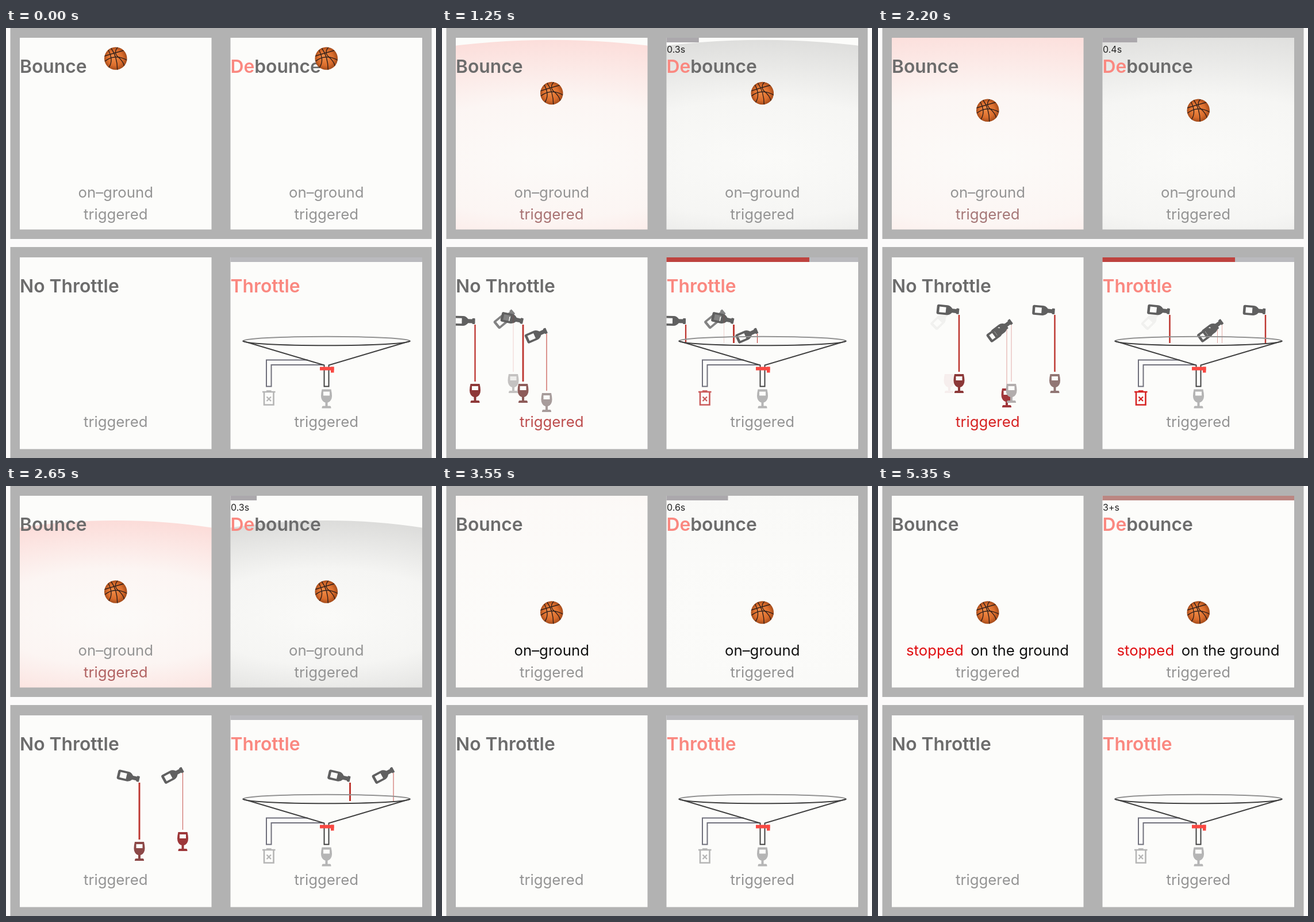
Write an HTML page with a canvas that moves like this. It is 748 by 748 pixels and loops after 5400 ms.

```html
<!DOCTYPE html>
<html lang="en">
<head>
<meta charset="utf-8">
<title>Debounce and throttle</title>
<style>
  html, body { margin: 0; width: 100%; height: 100%; overflow: hidden; background: #fbfafa; }
  canvas { display: block; width: 748px; height: 748px; }
</style>
</head>
<body>
<canvas id="stage" width="748" height="748"></canvas>
<script>
const g = document.getElementById('stage').getContext('2d');
const LOOP = 5400, SPEED = 0.0016;
const LEFT = 24, RIGHT = 390.5, SHIFT = RIGHT - LEFT, SIZE = 333.5, TOP = 17, BOTTOM = 399;
const GREY = [148, 148, 148], RED = [215, 32, 32], ICON = [181, 181, 181];
const PAPER = '#fcfcfa', FONT = 'Inter, sans-serif';

// Ground contacts and the height of the bounce that follows each one
const HITS = [1040, 1975, 2480, 2821, 3045, 3150];
const HEIGHTS = [137, 77, 36, 14, 4];
const LAST_HIT = HITS[HITS.length - 1], SETTLED = LAST_HIT + 2 / SPEED + 5;

// Pours: mouth x, glass y, start time
const POURS = [
  [57.5, 635, 636], [141, 635, 775], [182, 651, 1075], [124, 618, 1205],
  [224, 643, 1275], [141, 618, 1626], [307.5, 618, 1790], [232, 635, 2135]
];
const POUR_TIME = 1000, COOLDOWN = 745;

const drops = POURS.map(p => p[2] + 60), accepted = [], rejected = [];
for (const t of drops) {
  const open = !accepted.length || t - accepted[accepted.length - 1] >= COOLDOWN;
  (open ? accepted : rejected).push(t);
}

const clamp = v => Math.max(0, Math.min(1, v));
const rgb = c => `rgb(${c.map(Math.round)})`;
const mix = (a, b, k) => a.map((v, i) => v + (b[i] - v) * k);
const since = (times, t) => t - Math.max(-1e6, ...times.filter(x => x <= t));
const flash = (from, times, t) => rgb(mix(from, RED, clamp(1 - since(times, t) / 300)));

function rect(x, y, w, h, color) {
  g.fillStyle = color;
  g.fillRect(x, y, w, h);
}

function text(str, x, y, size, color, align = 'left', weight = 400) {
  g.font = `${weight} ${size}px ${FONT}`;
  g.textAlign = align;
  g.fillStyle = color;
  g.fillText(str, x, y);
}

const label = (str, x, y, color, align = 'center') => text(str, x, y, 25.8, color, align);

function title(str, x, y, color = '#6c6c6c') {
  text(str, x, y, 31.8, color, 'left', 600);
  return x + g.measureText(str).width;
}

function stroke(path, color, width = 2) {
  g.strokeStyle = color;
  g.lineWidth = width;
  g.stroke(new Path2D(path));
}

function inPanel(x, y, draw) {
  g.save();
  g.beginPath();
  g.rect(x, y, SIZE, SIZE);
  g.clip();
  draw();
  g.restore();
}

function ballHeight(t) {
  if (t < HITS[0]) return 167 * (1 - (t / HITS[0]) ** 2.5);
  const i = HITS.filter(h => h <= t).length - 1;
  if (i >= HEIGHTS.length) return 0;
  const k = (t - HITS[i]) / (HITS[i + 1] - HITS[i]);
  return HEIGHTS[i] * (1 - Math.abs(2 * k - 1) ** 2.5);
}

function ball(x, y) {
  g.save();
  g.translate(x, y);
  const shade = g.createRadialGradient(-4, -3, 2, 0, 0, 20);
  shade.addColorStop(0, '#f08a45');
  shade.addColorStop(0.65, '#d96c2c');
  shade.addColorStop(1, '#a24a1a');
  g.fillStyle = shade;
  g.beginPath();
  g.arc(0, 0, 19.8, 0, 7);
  g.fill();
  g.clip();
  stroke('M-20 -4Q-4 -9 14 -14M-8 -18Q3 -3 3 20M-19 5Q-2 -9 20 3M4 -20Q-5 -10 5 -2Q13 5 15 13M-13 -15Q-3 3 -12 16', '#33201a', 1.4);
  g.restore();
}

function ripple(x, age, color) {
  if (age < 0 || age > 500) return;
  const r = age * 0.98;
  g.save();
  g.globalAlpha = 1 - (age / 500) ** 2;
  g.translate(x, 227.5);
  g.scale(2.62, 1);
  const fade = g.createRadialGradient(0, 0, 0, 0, 0, r);
  fade.addColorStop(0, `rgba(${color},.01)`);
  fade.addColorStop(0.5, `rgba(${color},.045)`);
  fade.addColorStop(1, `rgba(${color},.2)`);
  g.fillStyle = fade;
  g.beginPath();
  g.arc(0, 0, r, 0, 7);
  g.fill();
  g.restore();
}

function bouncePanel(x, t, triggers, rippleTimes, color) {
  const center = x + SIZE / 2, height = ballHeight(t);
  inPanel(x, TOP, () => rippleTimes.forEach(h => ripple(center, t - h, color)));
  if (t >= SETTLED) {
    label('stopped', x + 25, 295, '#e00f12', 'left');
    label('on the ground', x + 308, 295, '#111', 'right');
  } else {
    label('on–ground', center, 295, height < 10 ? '#111' : rgb(GREY));
  }
  label('triggered', center, 332.5, flash(GREY, triggers, t));
  return () => ball(center, 220 - height);
}

function glass(x, y, color) {
  g.save();
  g.translate(x, y);
  g.fillStyle = color;
  g.fill(new Path2D('M-8 -16H8Q11 -3 8 2Q6 6 2 7V13H6Q8 13 8 17H-8Q-8 13 -6 13H-2V7Q-6 6 -8 2Q-11 -3 -8 -16Z'));
  rect(-5.5, -12, 11, 7, PAPER);
  g.restore();
}

function bottle(x, y, angle) {
  g.save();
  g.translate(x, y);
  g.rotate(angle * Math.PI / 180);
  g.fillStyle = '#606060';
  g.fill(new Path2D('M0 -4Q0 -5 -1 -5H-4Q-5 -5 -5 -3.5H-12Q-16 -8.5 -21 -8.5H-36Q-39 -8.5 -39 -5.5V5.5Q-39 8.5 -36 8.5H-21Q-16 8.5 -12 3.5H-5Q-5 5 -4 5H-1Q0 5 0 4ZM-34.5 -4.8V4.8H-23V-4.8Z'), 'evenodd');
  g.restore();
}

function glassColor(k) {
  const brown = [144, 117, 114], dark = [138, 56, 56];
  if (k < 0.42) return rgb(mix([184, 184, 184], brown, k / 0.42));
  if (k < 0.55) return rgb(mix(brown, dark, (k - 0.42) / 0.13));
  return rgb(mix(dark, [165, 54, 58], (k - 0.55) / 0.45));
}

function pours(t, shift, withGlass) {
  for (const [px, y, start] of POURS) {
    const age = t - start, x = px + shift;
    if (age <= 0 || age >= POUR_TIME) continue;
    const k = age / POUR_TIME, angle = 15 - 120 * Math.abs(k - 0.5);
    g.globalAlpha = clamp(Math.min(age, POUR_TIME - age) / 60);
    if (angle > -40) {
      const w = (angle + 45) / 20, from = y - 119, to = withGlass ? y - 20 : 548;
      rect(x - w / 2, from, w, to - from, '#bd352f');
    }
    if (withGlass) glass(x, y, glassColor(k));
    bottle(x, y - 125, angle);
    g.globalAlpha = 1;
  }
}

function funnel(t) {
  const pipe = '#70707c', dark = '#414141';
  stroke('M412 544.5A145.5 7.7 0 0 1 703 544.5', '#929292');
  stroke('M412 544.5A145.5 7.7 0 0 0 703 544.5', dark);
  stroke('M525 577.5H453V623.5H461.5V586H553', pipe);
  stroke('M412 544.5L553.5 586.5V623.5H561.5V586.5L703 544.5', dark);
  rect(546, 589.5, 24.5, 6, '#f94842');
  rect(565, 589.5, 5.5, 10, '#f94842');
  const bin = flash(ICON, rejected, t);
  stroke('M446 633H468.5M453 631.5H461.5M449 634V655.5H465.5V634', bin, 2.6);
  stroke('M453.5 641.5L461 649M461 641.5L453.5 649', bin, 2.2);
  glass(557.5, 644.5, flash(ICON, accepted, t));
}

function debounceTimer(t) {
  if (t < HITS[0]) return;
  const elapsed = since(HITS, t) * SPEED, full = clamp(elapsed / 2);
  rect(RIGHT, TOP, SIZE * full, 8, full < 1 ? '#aba8ac' : '#bb8682');
  text(elapsed >= 3 ? '3+s' : Math.round(elapsed * 10) / 10 + 's', RIGHT + 0.5, 42.5, 16, '#222');
}

function throttleTimer(t) {
  rect(RIGHT, BOTTOM, SIZE, 8, '#bababe');
  const k = since(accepted, t) / COOLDOWN;
  if (k < 1) rect(RIGHT, BOTTOM, SIZE * k, 8, '#be433f');
}

function draw(t) {
  rect(0, 0, 748, 748, '#fbfafa');
  for (const [y, h, inner] of [[0, 367, TOP], [381, 367, BOTTOM]]) {
    rect(7.5, y, 733, h, '#b2b2b2');
    for (const x of [LEFT, RIGHT]) rect(x, inner, SIZE, SIZE, PAPER);
  }

  const firstBall = bouncePanel(LEFT, t, HITS, HITS, '250,70,60');
  title('Bounce', LEFT, 77.5);
  firstBall();

  inPanel(RIGHT, TOP, () => ripple(RIGHT + SIZE / 2, t - SETTLED, '250,70,60'));
  const secondBall = bouncePanel(RIGHT, t, [SETTLED], HITS, '70,70,70');
  debounceTimer(t);
  title('bounce', title('De', RIGHT, 77.5, '#fa8880'), 77.5);
  secondBall();

  title('No Throttle', LEFT, 459.5);
  label('triggered', LEFT + SIZE / 2, 693.5, flash(GREY, drops, t));
  inPanel(LEFT, BOTTOM, () => pours(t, 0, true));

  throttleTimer(t);
  title('Throttle', RIGHT, 459.5, '#fa8880');
  label('triggered', RIGHT + SIZE / 2, 693.5, flash(GREY, accepted, t));
  inPanel(RIGHT, BOTTOM, () => pours(t, SHIFT, false));
  funnel(t);
}

function tick() {
  draw(performance.now() % LOOP);
  requestAnimationFrame(tick);
}
tick();
</script>
</body>
</html>
```
